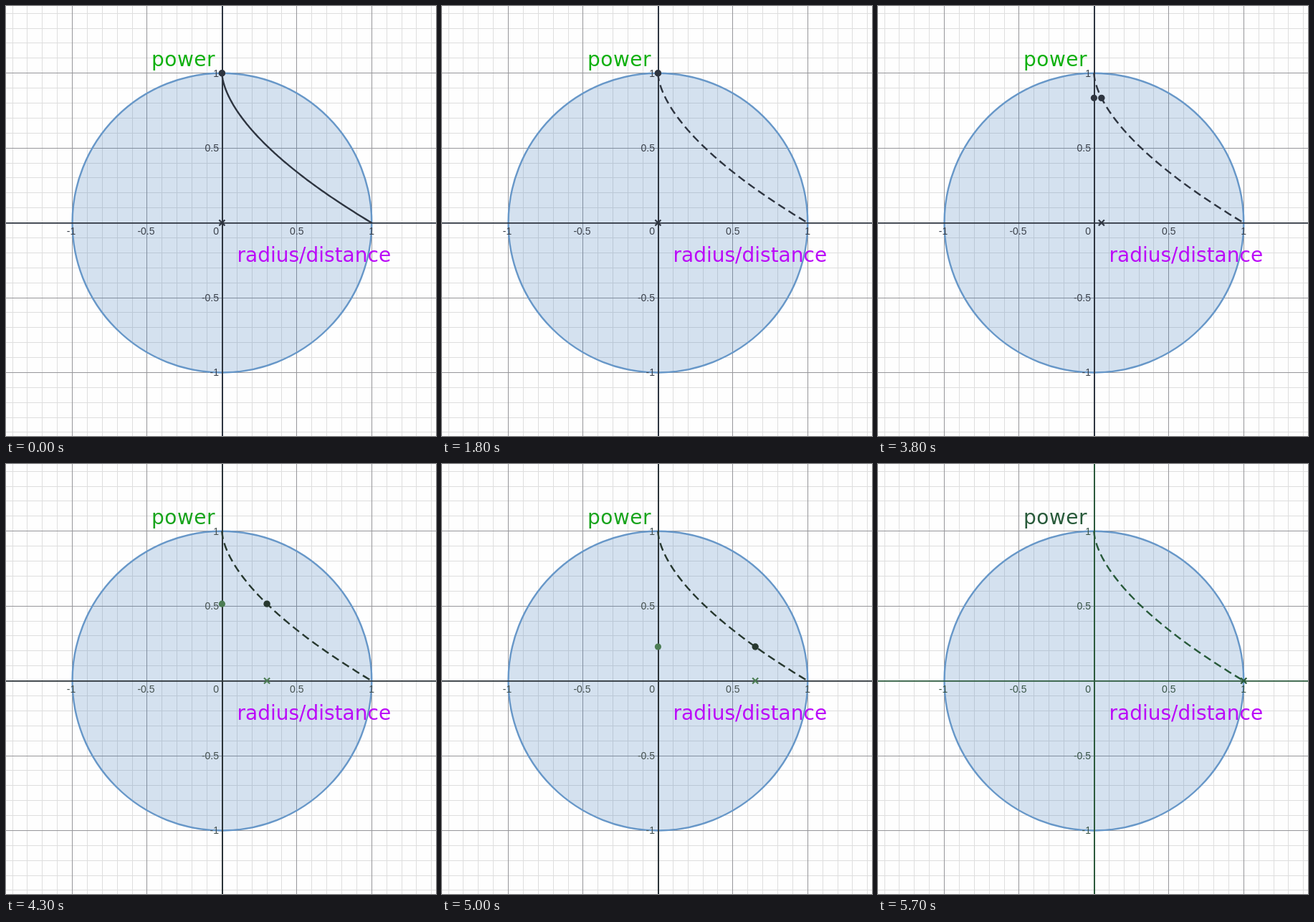
These frames come from a looping animation (600 by 600 pixels, 7200 ms). An HTML page:

```html
<!DOCTYPE html>
<html lang="en">
<head>
<meta charset="utf-8">
<title>Power over distance</title>
<style>
  html, body { margin: 0; width: 100%; height: 100%; overflow: hidden; background: #fefefe; }
  svg { display: block; width: 600px; height: 600px; }
  .minor { stroke: #dedede; }
  .major { stroke: #96969a; }
  .num { font: 14px "Liberation Sans", Arial, sans-serif; fill: var(--num); }
  .disc { fill: #2d70b3; fill-opacity: .2; stroke: #6797c8; stroke-width: 2.4; }
  .axis { stroke: var(--axis); }
  .curve { fill: none; stroke: var(--ink); stroke-width: 2.4; }
  .dashed { stroke-dasharray: 11 6; }
  .dot { fill: var(--ink); }
  .lead { fill: var(--mark); }
  .cross { stroke: var(--mark); stroke-width: 2.2; fill: none; }
  .title { font: 28px "DejaVu Sans", Verdana, sans-serif; }
</style>
</head>
<body>
<svg id="stage" viewBox="0 0 600 600"></svg>
<script>
  const LOOP = 7200, MOVE = 3800, STEP = 100, END = 5700;
  const CX = 301.42, CY = 302.58, UNIT = 208.85;
  const stage = document.getElementById('stage');
  const px = x => CX + x * UNIT;
  const py = y => CY - y * UNIT;
  const crisp = v => Math.floor(v) + 0.5;
  const falloff = x => 1 - Math.pow(x, 0.6);

  function add(tag, cls, attrs, text) {
    const el = document.createElementNS('http://www.w3.org/2000/svg', tag);
    el.setAttribute('class', cls);
    for (const key in attrs) el.setAttribute(key, attrs[key]);
    if (text) el.textContent = text;
    stage.appendChild(el);
    return el;
  }

  function gridLines(cls, wanted) {
    for (let i = -14; i <= 14; i++) {
      if ((i % 5 === 0) !== wanted) continue;
      add('path', cls, { d: `M${crisp(px(i / 10))} 0V600M0 ${crisp(py(i / 10))}H600` });
    }
  }

  function number(text, x, y, anchor) {
    add('text', 'num', { x, y, 'text-anchor': anchor }, text);
  }

  gridLines('minor', false);
  gridLines('major', true);
  add('circle', 'disc', { cx: CX, cy: CY, r: UNIT });
  add('path', 'axis', { d: 'M302 0V600', 'stroke-width': 2 });
  add('path', 'axis', { d: 'M0 302.8H600', 'stroke-width': 1.7 });

  for (const v of [-1, -0.5, 0.5, 1]) {
    number(String(v), px(v) - (v < 0 ? 1.5 : 0), 319, 'middle');
    number(String(v), 297, py(v) + 4.8, 'end');
  }
  number('0', 297, 319, 'end');

  // Denser samples near the steep start
  const points = [];
  for (let i = 0; i <= 120; i++) {
    const x = Math.pow(i / 120, 2.5);
    points.push(px(x).toFixed(2) + ',' + py(falloff(x)).toFixed(2));
  }
  const curve = add('polyline', 'curve', { points: points.join(' ') });
  const lead = add('circle', 'lead', { cx: CX, r: 4.6 });
  const dot = add('circle', 'dot', { r: 4.7 });
  const cross = add('path', 'cross', { d: 'M-4-4L4 4M-4 4L4-4' });

  add('text', 'title', { x: 203, y: 83.5, fill: 'var(--power)', 'letter-spacing': 0.5 }, 'power');
  add('text', 'title', { x: 322.5, y: 357, fill: '#bb0af8' }, 'radius/distance');

  // Colours: curve, axes, moving marks, power title, numbers
  const NAMES = ['ink', 'axis', 'mark', 'power', 'num'];
  const DARK = ['#2e3540', '#2e3540', '#2e3540', '#10b010', '#3c424c'];
  const GREY = ['#2c3440', '#2c3440', '#525960', '#10b010', '#3c424c'];
  const MOSS = ['#27382f', '#2b3338', '#4c7d54', '#18a41c', '#465250'];
  const PINE = ['#285a3a', '#2c5a3d', '#285a3a', '#285a3a', '#3a5648'];

  function tones(t) {
    if (t >= END) return PINE;
    if (t < 4100) return DARK;
    return t >= 4600 && t < 5000 ? GREY : MOSS;
  }

  function isDashed(t) {
    return t >= 3100 || (t >= 600 && t < 1200) || (t >= 1800 && t < 2500);
  }

  function draw(t) {
    const steps = t < MOVE ? 0 : Math.min(20, Math.floor((t - MOVE) / STEP) + 1);
    const x = steps / 20, y = falloff(x);
    const shown = steps < 20 ? 'visible' : 'hidden';

    curve.setAttribute('class', isDashed(t) ? 'curve dashed' : 'curve');
    lead.setAttribute('cy', py(y));
    dot.setAttribute('cx', px(x));
    dot.setAttribute('cy', py(y));
    lead.setAttribute('visibility', shown);
    dot.setAttribute('visibility', shown);
    cross.setAttribute('transform', `translate(${px(x)} ${CY})`);

    const colours = tones(t);
    NAMES.forEach((name, i) => stage.style.setProperty('--' + name, colours[i]));
  }

  const start = performance.now();
  function tick() {
    draw((performance.now() - start) % LOOP);
    requestAnimationFrame(tick);
  }
  tick();
</script>
</body>
</html>
```
